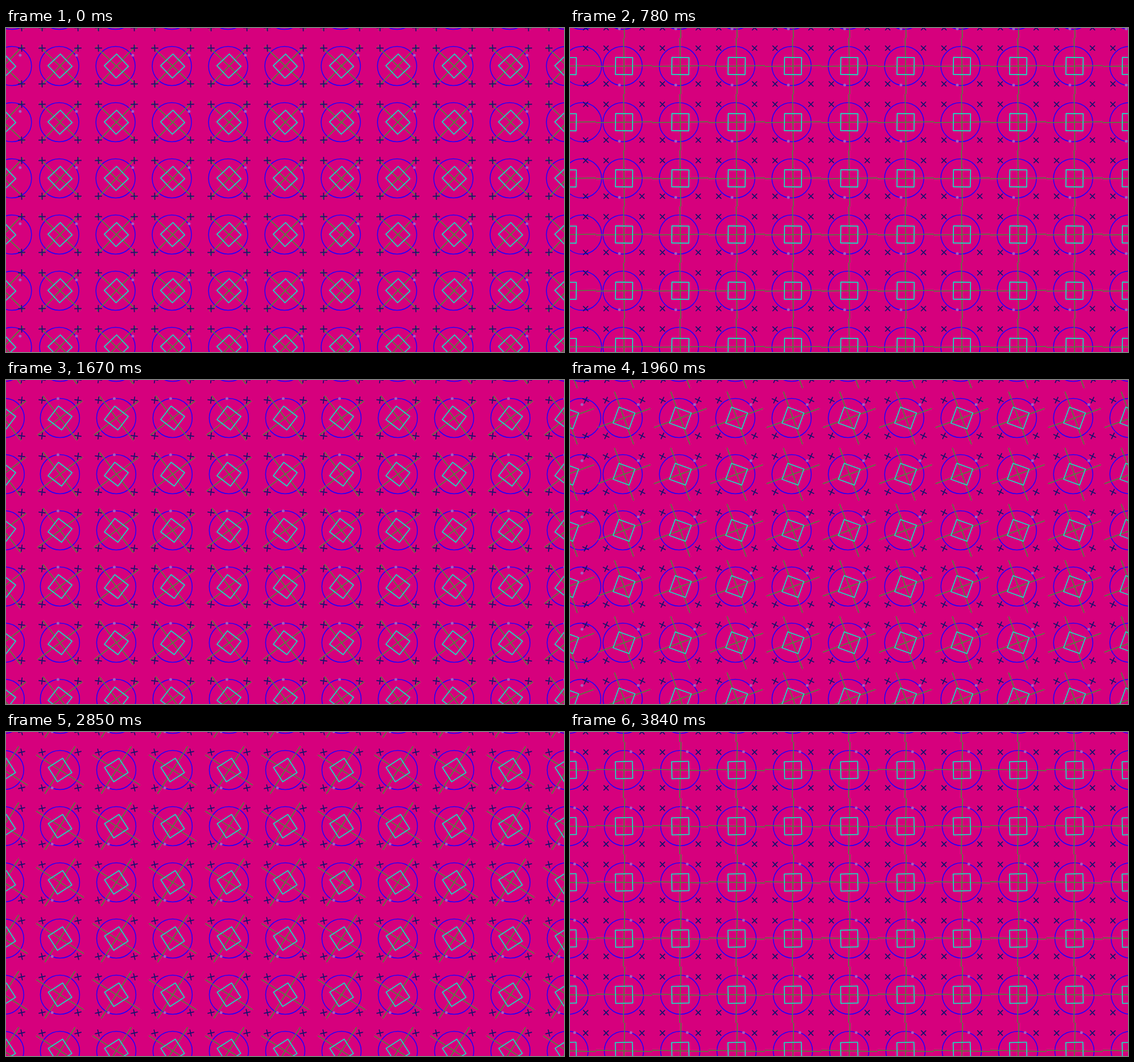
These frames come from a looping animation (981 px wide and 571 px high, 3.94 s). An HTML page with a canvas:

```html
<!DOCTYPE html>
<html>
<head>
<meta charset="utf-8">
<style>
html, body { margin: 0; height: 100%; overflow: hidden; background: #d6007d; }
canvas { display: block; }
</style>
</head>
<body>
<canvas id="stage" width="981" height="571"></canvas>
<script>
const ctx = document.getElementById('stage').getContext('2d');
const LOOP = 3940, PITCH = 99, COLS = 11, ROWS = 7;
const TAU = Math.PI * 2, RAD = Math.PI / 180;

// The picture is held between these moments; poses are the motion clock at each.
const changes = [0, 180, 480, 780, 1080, 1370, 1670, 1960, 2260, 2560, 2850, 3150, 3450, 3840];
const poses = [0, 176, 469, 760, 1051, 1351, 1651, 1943, 2236, 2526, 2816, 3112, 3408, 3799];

function stroke(color, width) {
  ctx.strokeStyle = color;
  ctx.lineWidth = width;
  ctx.stroke();
}

function cross(x, y, half, angle, color, width) {
  const c = half * Math.cos(angle), s = half * Math.sin(angle);
  ctx.beginPath();
  ctx.moveTo(x - c, y - s);
  ctx.lineTo(x + c, y + s);
  ctx.moveTo(x + s, y - c);
  ctx.lineTo(x - s, y + c);
  stroke(color, width);
}

function square(x, y, side, angle) {
  ctx.save();
  ctx.translate(x, y);
  ctx.rotate(angle);
  ctx.beginPath();
  ctx.rect(-side / 2, -side / 2, side, side);
  ctx.lineJoin = 'round';
  stroke('#1fd8c0', 1.8);
  ctx.restore();
}

// Sideways push of the first column of rings; the others give way by a tenth.
function push(time) {
  const wave = (1 + Math.cos((time - 920) / 1200 * TAU)) / 2;
  return Math.min(28, 32 * wave ** 1.35);
}

function draw(time) {
  const spin = (time * 0.06 - 46.5) * RAD;
  const orbit = (time * 0.18 - 33.2) * RAD;
  const shift = push(time);
  ctx.fillStyle = '#d6007d';
  ctx.fillRect(0, 0, 981, 571);
  for (let row = 0; row < ROWS; row++) {
    for (let col = 0; col < COLS; col++) {
      const x = col * PITCH - 4, y = row * PITCH - 32;
      ctx.beginPath();
      ctx.arc(x + (col ? -shift / 10 : shift), y, 34.5, 0, TAU);
      stroke('#2000ff', 1.5);
      cross(x, y, 49.5, spin, '#4b8b3b', 1.6);
      square(x, y, 30, -spin);
      for (const dx of [-31.5, 31.5])
        for (const dy of [-31.5, 31.5])
          cross(x + dx, y + dy, 6.3, spin + Math.PI / 4, '#12126e', 1.7);
      ctx.fillStyle = '#a062c0';
      ctx.beginPath();
      ctx.arc(x + 34.5 * Math.cos(orbit), y + 34.5 * Math.sin(orbit), 2.5, 0, TAU);
      ctx.fill();
    }
  }
}

const start = performance.now();
function tick() {
  const t = (performance.now() - start) % LOOP;
  draw(poses[changes.findLastIndex(c => c <= t)]);
  requestAnimationFrame(tick);
}
tick();
</script>
</body>
</html>
```
